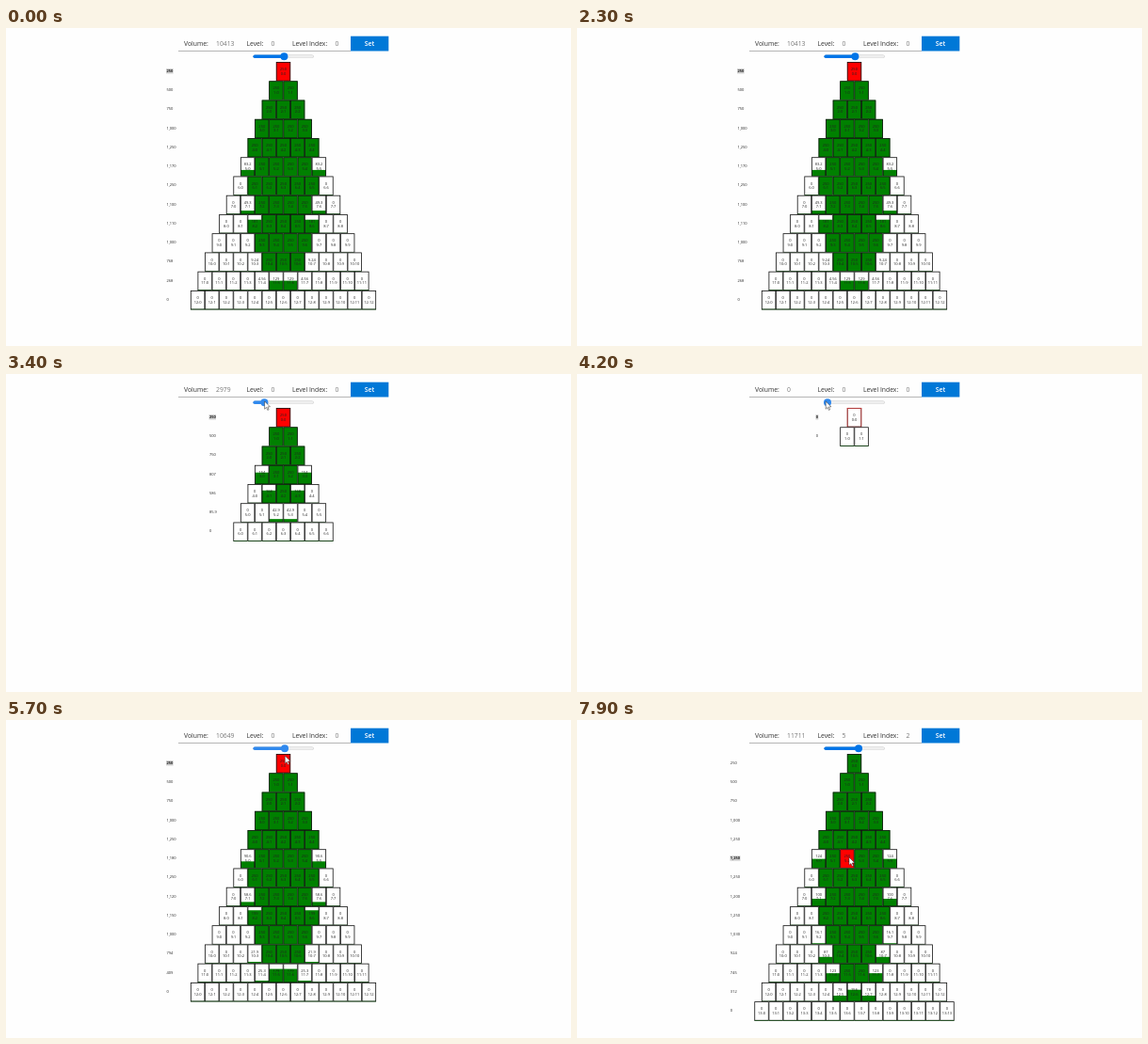
Animation of 600x338 px, one loop 8 s. Source, as an HTML page with a canvas:

```html
<!DOCTYPE html>
<html lang="en">
<head>
<meta charset="utf-8">
<title>Overflow pyramid</title>
<style>
html, body { margin: 0; width: 100%; height: 100%; overflow: hidden; background: #fefefe; }
canvas { display: block; width: 600px; height: 338px; }
</style>
</head>
<body>
<canvas id="stage"></canvas>
<script>
const W = 600, H = 338, LOOP = 8000, STEP = 100;
const CAP = 250, CELL_W = 15.15, CELL_H = 20.24, MID = 294.5, TOP = 36.2;
const FONT = '"Open Sans", "Noto Sans", sans-serif';

const canvas = document.getElementById('stage');
const ctx = canvas.getContext('2d');
const dpr = window.devicePixelRatio || 1;
canvas.width = W * dpr;
canvas.height = H * dpr;

// [time, volume]
const volumeKeys = [
  [2300, 10413], [2500, 9500], [2900, 7581], [3100, 5250], [3400, 3000],
  [3700, 1000], [3900, 0], [4300, 0], [4600, 3100], [4900, 6519],
  [5000, 6519], [5400, 9100], [5700, 10649], [5900, 10649], [6300, 11711]
];
// [time, pointer y] while dragging the slider
const dragKeys = [[2300, 28], [2900, 29], [4200, 29], [5000, 36], [5700, 38], [6300, 38]];
// [time, x, y] while moving freely
const approachKeys = [[900, 312, 68], [1200, 298, 30], [1500, 306, 68]];
const leaveKeys = [[7200, 301, 40], [7400, 324, 92], [7600, 289, 146]];

function at(keys, t, col = 1) {
  if (t <= keys[0][0]) return keys[0][col];
  for (let i = 1; i < keys.length; i++) {
    const a = keys[i - 1], b = keys[i];
    if (t <= b[0]) return a[col] + (b[col] - a[col]) * (t - a[0]) / (b[0] - a[0]);
  }
  return keys[keys.length - 1][col];
}

function volumeAt(t) {
  const v = at(volumeKeys, t);
  return v < 29 ? 0 : 29 + 118 * Math.round((v - 29) / 118);
}

const thumbX = v => 266 + v * 0.00282;
const fmt = n => n.toLocaleString('en-US', { maximumSignificantDigits: 3 });

// Each full cell spills half of its excess into the two cells below.
function pour(volume) {
  const rows = [];
  let flow = [volume];
  for (;;) {
    const row = flow.map(v => Math.min(v, CAP));
    const total = row.reduce((a, b) => a + b, 0);
    rows.push({ row, total });
    if (rows.length > 1 && total === 0) return rows;
    const next = new Array(flow.length + 1).fill(0);
    flow.forEach((v, i) => {
      const half = Math.max(0, v - CAP) / 2;
      next[i] += half;
      next[i + 1] += half;
    });
    flow = next;
  }
}

function text(str, x, y, size, color, align = 'left', weight = 400) {
  ctx.font = `${weight} ${size}px ${FONT}`;
  ctx.textAlign = align;
  ctx.textBaseline = 'middle';
  ctx.fillStyle = color;
  ctx.fillText(str, x, y);
}

function rect(x, y, w, h, color) {
  ctx.fillStyle = color;
  ctx.fillRect(x, y, w, h);
}

function pill(x, y, w, h, color) {
  ctx.fillStyle = color;
  ctx.beginPath();
  ctx.roundRect(x, y, w, h, h / 2);
  ctx.fill();
}

function drawHeader(volume, level, index) {
  const y = 17;
  [['Volume:', 189], ['Level:', 255.5], ['Level Index:', 304]]
    .forEach(([s, x]) => text(s, x, y, 6.8, '#333', 'left', 500));
  [[volume, 223], [level, 281.5], [index, 349.5]]
    .forEach(([s, x]) => text(String(s), x, y, 6.8, '#777'));
  rect(183, 24.1, 183, 0.7, '#999');
  rect(366, 8.7, 40.3, 15.8, '#0078d7');
  text('Set', 386, y, 7, '#fff', 'center', 600);
}

function drawSlider(volume, color) {
  const x = thumbX(volume);
  pill(262.4, 28.5, 64.4, 3.6, '#c8c8c8');
  pill(262.8, 28.9, 63.6, 2.8, '#efefef');
  pill(262.4, 28.5, x - 262.4, 3.6, color);
  ctx.fillStyle = color;
  ctx.beginPath();
  ctx.arc(x, 30.3, 4, 0, 7);
  ctx.fill();
}

function drawCell(x, y, value, name, selected) {
  const h = CELL_H * value / CAP;
  const color = selected ? '#ff0000' : '#008000';
  rect(x, y, CELL_W, CELL_H, '#fff');
  rect(x, y + CELL_H - h, CELL_W, h, color);
  ctx.lineWidth = 0.8;
  ctx.strokeStyle = '#111';
  ctx.strokeRect(x + 0.3, y + 0.3, CELL_W - 0.6, CELL_H - 0.6);
  if (selected && value === 0) {
    ctx.lineWidth = 0.7;
    ctx.strokeStyle = '#f04040';
    ctx.strokeRect(x + 0.2, y + 0.1, CELL_W - 0.4, CELL_H - 0.2);
  }
  rect(x, y + CELL_H - 0.6, CELL_W, 0.6, selected ? '#a00000' : '#004800');
  const cx = x + CELL_W / 2, cy = y + CELL_H / 2;
  text(fmt(value), cx, cy - 2.2, 4, '#222', 'center');
  text(name, cx, cy + 2.4, 4, '#222', 'center');
}

function drawTower(volume, level, index) {
  const rows = pour(volume);
  const labelX = MID - rows.length * CELL_W / 2 - 25.6;
  rows.forEach(({ row, total }, r) => {
    const y = TOP + r * CELL_H, left = MID - row.length * CELL_W / 2;
    const label = fmt(total), active = r === level;
    const cy = y + CELL_H / 2 - 0.5;
    if (active) {
      ctx.font = `700 4px ${FONT}`;
      rect(labelX - 0.3, cy - 2.7, ctx.measureText(label).width + 0.6, 5.4, '#d0d0d0');
    }
    text(label, labelX, cy, 4, '#222', 'left', active ? 700 : 400);
    row.forEach((v, c) => {
      drawCell(left + c * CELL_W, y, v, `${r}:${c}`, active && c === index);
    });
  });
}

function drawPointer(x, y) {
  const pts = [[0, 0], [0, 8.2], [1.9, 6.5], [3.2, 9.4], [4.5, 8.8], [3.2, 6], [5.8, 5.8]];
  ctx.beginPath();
  pts.forEach(([px, py]) => ctx.lineTo(x + px, y + py));
  ctx.closePath();
  ctx.fillStyle = '#fff';
  ctx.fill();
  ctx.lineWidth = 0.5;
  ctx.strokeStyle = '#222';
  ctx.stroke();
}

function pointerAt(t, volume) {
  if (t >= 900 && t < 1500) return [at(approachKeys, t), at(approachKeys, t, 2)];
  if (t <= 2300) return null;
  if (t < 7200) return [thumbX(volume) + 0.2 - (volume ? 0 : 2), at(dragKeys, t)];
  return [at(leaveKeys, t), at(leaveKeys, t, 2)];
}

function sliderColor(t) {
  if (t > 2300 && t <= 6300) return '#3089ee';
  if (t >= 1100 && t < 1400) return '#005cc8';
  return '#0075e8';
}

function draw(t) {
  const volume = volumeAt(t);
  const [level, index] = t >= 7800 ? [5, 2] : [0, 0];
  ctx.setTransform(dpr, 0, 0, dpr, 0, 0);
  rect(0, 0, W, H, '#fefefe');
  drawHeader(volume, level, index);
  drawSlider(volume, sliderColor(t));
  drawTower(volume, level, index);
  const p = pointerAt(t, volume);
  if (p) drawPointer(p[0], p[1]);
}

const start = performance.now();
function tick() {
  const t = (performance.now() - start) % LOOP;
  draw(Math.floor(t / STEP) * STEP);
  requestAnimationFrame(tick);
}
tick();
</script>
</body>
</html>
```
